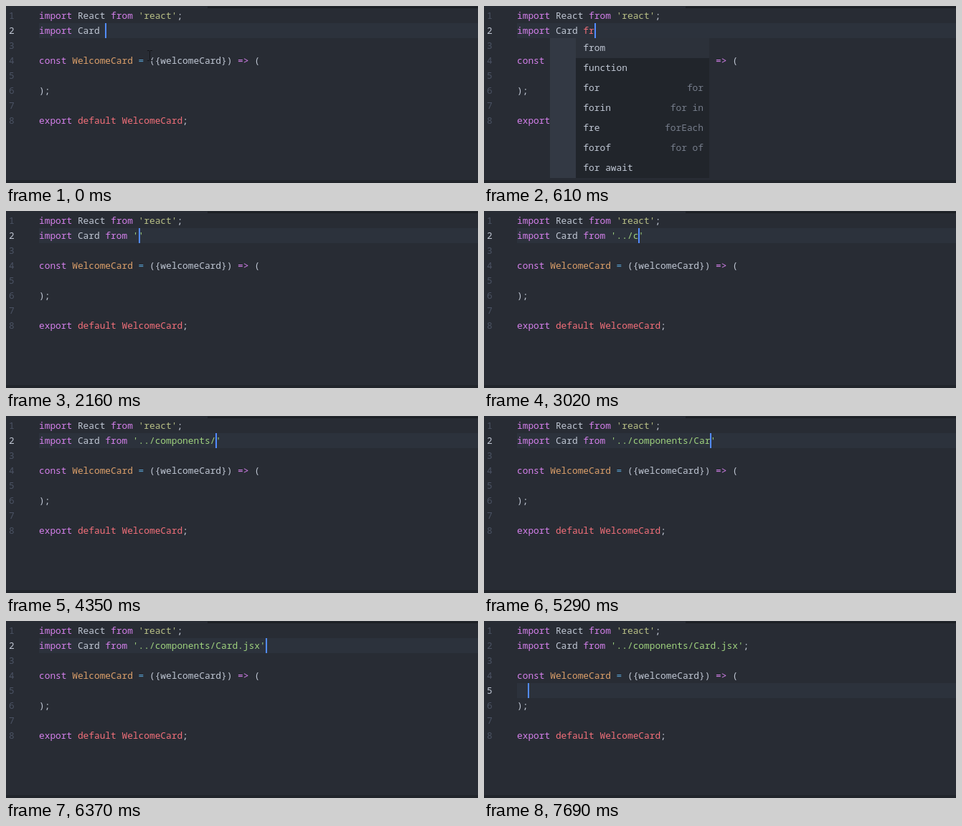
An HTML page with a canvas for the animation above (8 s loop, 658 by 248 pixels).

```html
<!DOCTYPE html>
<html lang="en">
<head>
<meta charset="utf-8">
<title>Typing an import</title>
<style>
html, body { margin: 0; width: 100%; height: 100%; overflow: hidden; background: #282c34; }
canvas { display: block; }
</style>
</head>
<body>
<canvas id="stage" width="658" height="248"></canvas>
<script>
const ctx = document.getElementById('stage').getContext('2d', {alpha: false});
const LOOP = 8000, CHAR = 7.697, LEFT = 46, TOP = 3, ROW = 21;
const TEXT = '#c0c7d4', PURPLE = '#d580ec', ORANGE = '#dda06a', RED = '#f4707a',
      GREEN = '#9fd27e', OLIVE = '#b9c086', BLUE = '#589fd0', DIM = '#4b5364';

const lines = [
  [['import ', PURPLE], ['React ', TEXT], ['from ', PURPLE], ["'react'", OLIVE], [';', TEXT]],
  [],
  [],
  [['const ', PURPLE], ['WelcomeCard ', ORANGE], ['= ', BLUE], ['({welcomeCard}) ', TEXT], ['=> ', PURPLE], ['(', TEXT]],
  [],
  [[');', TEXT]],
  [],
  [['export ', PURPLE], ['default WelcomeCard', RED], [';', TEXT]]
];

// One key time for each character of the typed text
const typed = "from '../components/Card.jsx';";
const keyTimes = [
  300, 460, 620, 770, 840, 1220, 2310, 2470, 2630,
  ...Array.from({length: 9}, (_, i) => 3020 + i * 117.5),
  4110, 4350, 5140, 5140, 5290, 5440, 5590, 5680, 5790, 5900, 6370, 6680
];
const caretOff = [[1780, 2160], [4820, 5140], [7160, 7460]];
const caretMoves = [[7460, 2, 0], [7580, 3, 40], [7690, 4, 2]];

// Completion lists: the labels line up with the word being typed
const popups = [
  {from: 380, to: 620, col: 12, width: 222, height: 196, rows: [
    ['from', ''], ['function', ''], ['for', 'for'], ['forin', 'for in'],
    ['fre', 'forEach'], ['forof', 'for of'], ['for await', '']
  ]},
  {from: 5590, to: 5790, col: 36, width: 207, height: 38, rows: [['jsx', '']]}
];

function rect(color, x, y, w, h) {
  ctx.fillStyle = color;
  ctx.fillRect(x, y, w, h);
}

function write(text, color, x, y) {
  ctx.fillStyle = color;
  [...text].forEach((c, i) => ctx.fillText(c, x + i * CHAR, y));
}

function within(t, from, to) {
  return t >= from && t < to;
}

function importLine(count) {
  const closing = count > 5 && count < 29 ? "'" : '';
  return [
    ['import ', PURPLE], ['Card ', TEXT],
    [typed.slice(0, Math.min(count, 5)), count < 5 ? RED : PURPLE],
    [typed.slice(5, Math.min(Math.max(count, 5), 29)) + closing, GREEN],
    [count > 29 ? ';' : '', TEXT]
  ];
}

function pointer() {
  rect('#14161a', 200, 63, 1, 13);
  for (const y of [62, 76]) {
    rect('#14161a', 197, y, 3, 1);
    rect('#14161a', 201, y, 3, 1);
  }
}

function popup({col, width, height, rows}) {
  const label = LEFT + col * CHAR, x = Math.round(label - 46), y = 45;
  const step = height / rows.length;
  rect('#21252b', x, y, width, height);
  rect('#2c313a', x, y, width, step);
  rect('#333944', x, y, 36, height);
  rows.forEach(([name, note], i) => {
    const base = y + (i + 0.5) * step + 4;
    write(name, TEXT, label, base);
    write(note, '#767d8b', x + width - 8 - note.length * CHAR, base);
  });
}

function draw(t) {
  const count = keyTimes.filter(k => k <= t).length;
  let row = 1, col = 12 + count;
  for (const [time, r, c] of caretMoves) if (t >= time) [row, col] = [r, c];

  rect('#282c34', 0, 0, 658, 248);
  rect('#21252b', 281, 0, 377, 2);
  rect('#181a1f', 281, 2, 377, 1);
  rect('#21252b', 0, 244, 658, 4);
  rect('#2c323c', LEFT, TOP + row * ROW, 658 - LEFT, ROW);

  ctx.font = '500 12.83px "Noto Sans Mono", "DejaVu Sans Mono", monospace';
  lines.forEach((line, i) => {
    const base = TOP + i * ROW + 15;
    write(String(i + 1), i === row ? TEXT : DIM, 4, base);
    let x = LEFT;
    for (const [text, color] of i === 1 ? importLine(count) : line) {
      write(text, color, x, base);
      x += text.length * CHAR;
    }
  });

  if (!caretOff.some(([from, to]) => within(t, from, to)))
    rect('#528bff', Math.round(LEFT + col * CHAR), TOP + row * ROW, 2, ROW);
  popups.filter(p => within(t, p.from, p.to)).forEach(popup);
  if (t < 220) pointer();
}

const start = performance.now();
function tick() {
  draw((performance.now() - start) % LOOP);
  requestAnimationFrame(tick);
}
tick();
</script>
</body>
</html>
```
